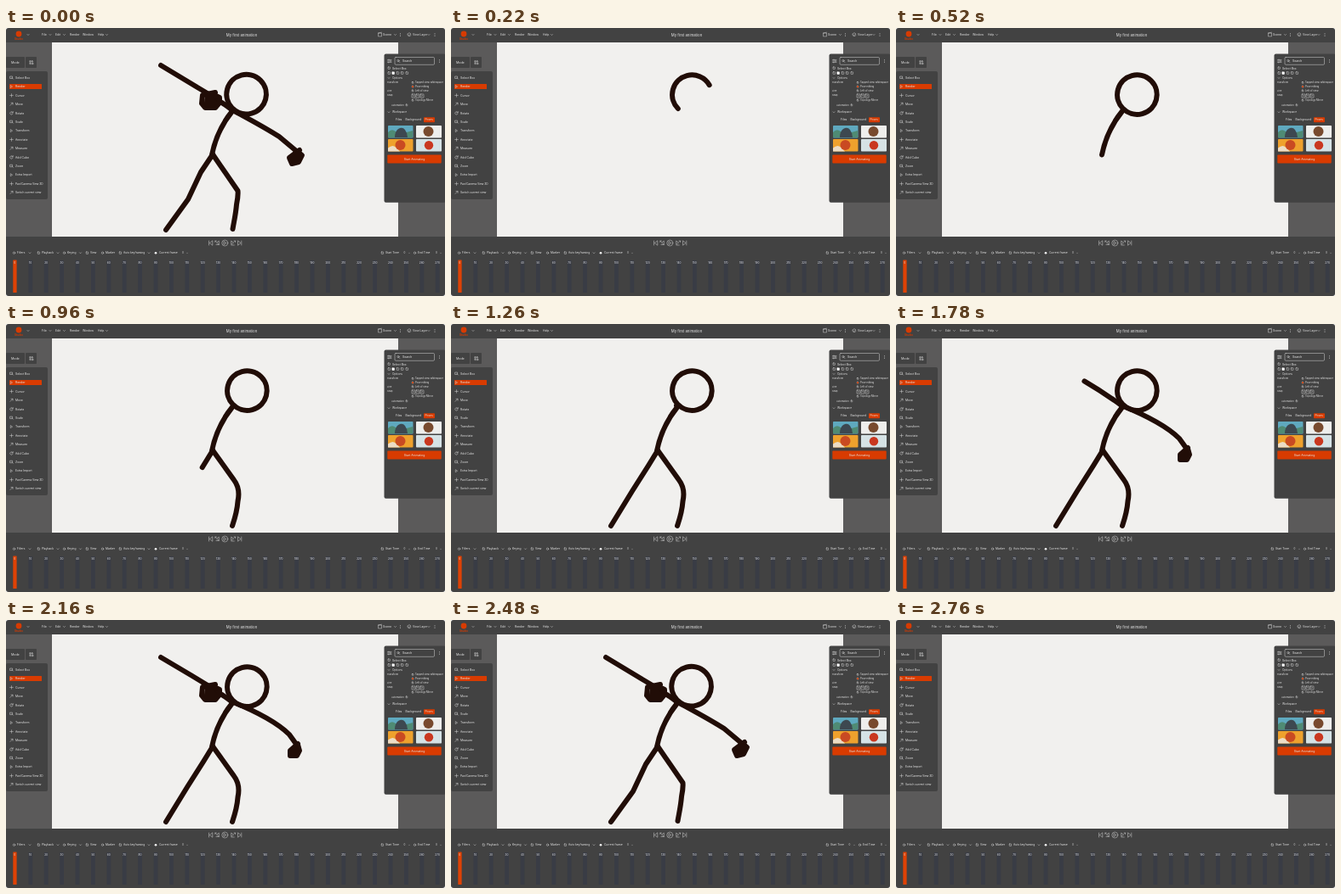
An HTML page for the animation above (2860 ms loop, 516 by 316 pixels).

```html
<!DOCTYPE html>
<html lang="en">
<head>
<meta charset="utf-8">
<title>Stick figure editor</title>
<style>
html, body { margin: 0; width: 100%; height: 100%; overflow: hidden; background: #fff; }
svg { display: block; width: 516px; height: 316px; }
text { font-family: Inter, Roboto, sans-serif; font-size: 3.4px; fill: #e6e6e6; }
.icon { fill: none; stroke: #d4d4d4; stroke-width: .5; stroke-linecap: round; stroke-linejoin: round; }
#figure path { fill: none; stroke: #210d07; stroke-width: 6; stroke-linecap: round; stroke-linejoin: round; }
</style>
</head>
<body>
<svg viewBox="0 0 516 316">
  <rect width="516" height="316" rx="3" fill="#424242"/>
  <rect y="17" width="516" height="229" fill="#5b5a5a"/>
  <rect x="54" y="17" width="407" height="229" fill="#f1f0ee"/>
  <g id="ui"></g>
  <g id="figure"></g>
</svg>
<script>
const NS = 'http://www.w3.org/2000/svg';
const ORANGE = '#d83b01', PANEL = '#424242', LIGHT = '#dedede';
const ui = document.getElementById('ui');
const figure = document.getElementById('figure');

function add(parent, tag, attrs, content) {
  const el = document.createElementNS(NS, tag);
  for (const key in attrs) el.setAttribute(key, attrs[key]);
  if (content !== undefined) el.textContent = content;
  parent.appendChild(el);
  return el;
}
const rect = (x, y, width, height, fill, rx = 0) => add(ui, 'rect', { x, y, width, height, fill, rx });
const disc = (cx, cy, r, fill) => add(ui, 'circle', { cx, cy, r, fill });
const icon = d => add(ui, 'path', { d, class: 'icon' });
const shape = (d, fill) => add(ui, 'path', { d, fill });
const ring = (cx, cy, r) => add(ui, 'circle', { cx, cy, r, class: 'icon' });
const box = (x, y, width, height, rx = .4) => add(ui, 'rect', { x, y, width, height, rx, class: 'icon' });
const label = (text, x, y, size = 3.4, anchor = 'start') =>
  add(ui, 'text', { x, y: y + size * .36, style: `font-size:${size}px`, 'text-anchor': anchor }, text);
const chevron = (x, y) => icon(`M${x - 1} ${y - .5}l1 1 1-1`);
const dots = (x, y) => [-1.5, 0, 1.5].forEach(dy => disc(x, y + dy, .45, LIGHT));

function drawTopBar() {
  disc(15, 7, 3.4, ORANGE);
  add(ui, 'text', { x: 15, y: 13.7, style: `font-size:3.2px;fill:${ORANGE};font-weight:600`, 'text-anchor': 'middle' }, 'Studio');
  chevron(26, 8);
  [['File', 42, 52], ['Edit', 58, 68.5], ['Render', 75], ['Window', 90], ['Help', 108, 118.5]].forEach(([name, x, arrow]) => {
    label(name, x, 7.7);
    if (arrow) chevron(arrow, 8);
  });
  label('My first animation', 277, 8, 4.3, 'middle');
  icon('M437.5 9.5v-3.5h4v3.5zM437.5 6l4-.8');
  label('Scene', 443, 7.7);
  chevron(457.5, 8);
  dots(463.5, 8);
  icon('M472 7l2-1.4 2 1.4-2 1.4zM472 8.5l2 1.4 2-1.4');
  label('View Layer', 478, 7.7, 3.3);
  chevron(497, 8);
  dots(504, 8);
}

function drawTools() {
  rect(0, 34, 22, 13, PANEL, 1);
  rect(23, 34, 13, 13, PANEL, 1);
  label('Mode', 6, 40.5, 3.6);
  box(27.8, 38.8, 1.4, 1.4);
  box(30.2, 38.8, 1.4, 1.4);
  box(27.8, 41.2, 1.4, 1.4);
  ring(31, 42, .9);
  rect(0, 51, 49, 151, PANEL, 2);
  rect(4, 66, 38, 6, ORANGE, .6);
  const tools = ['Select Box', 'Render', 'Cursor', 'Move', 'Rotate', 'Scale', 'Transform', 'Annotate',
    'Measure', 'Add Cube', 'Zoom', 'Extra Import', 'Pan/Camera View 3D', 'Switch current view'];
  const shapes = ['M5 57h2.5v2.5h-2.5zM7 58.7l1.4 1.4', 'M5.6 57.3l2 1.3-2 1.3z', 'M6.5 56.8v3.6M4.7 58.6h3.6',
    'M5 60l3-3M6 57h2v2', 'M8 58a1.7 1.7 0 1 0 0 1.5M8.2 56.7v1.5h-1.4'];
  tools.forEach((name, i) => {
    const y = 58.6 + i * 10.42;
    icon(shapes[i % shapes.length]).setAttribute('transform', `translate(0 ${y - 58.6})`);
    label(name, 11, y, i > 11 ? 3.25 : 3.4);
  });
}

function drawThumbs() {
  rect(449, 115, 29.5, 14.5, '#5fa9bf', .8);
  shape('M449 129v-6q4-5 9-1t9 2l11-3v8z', '#4f8b74');
  shape('M457 129q0-7 4-10 5-3 8 1 3 4 3 9z', '#3d4850');
  rect(482, 115, 30, 14.5, '#eeeeec', .8);
  disc(496.5, 122, 6, '#784a2e');
  rect(449, 131, 29.5, 14.5, '#eea12d', .8);
  shape('M449 145.5v-4q6-5 10 0l4 4z', '#ecdcc5');
  disc(463.5, 138, 6, '#c94a22');
  rect(482, 131, 30, 14.5, '#d5e2e5', .8);
  disc(497, 138.3, 5.2, '#c9371f');
}

function drawSidePanel() {
  rect(444.5, 30.5, 72, 175.2, PANEL, 2);
  icon('M448.5 37.5h4.5M448.5 39h4.5M448.5 40.5h4.5M450 37v1M452 38.5v1M449.8 40v1');
  box(457, 34.5, 46.5, 8.8, 1.2);
  ring(461, 38.6, 1.1);
  icon('M461.8 39.5l1 1');
  label('Search', 466, 38.9, 3.4);
  dots(509.5, 39);
  box(449, 46, 2.4, 2.4);
  label('Select Box', 454, 47.4, 3.3);
  [449, 453.8, 459.2, 464.4, 470].forEach((x, i) => {
    box(x, 51.8, 2.6, 2.6);
    if (i === 1) rect(x, 51.8, 2.8, 2.8, '#fff');
  });
  chevron(450, 59);
  label('Options', 454, 58.9, 3.3);
  label('Transform', 448, 64.4, 2.7);
  label('Tapped view whitespace', 481, 64.4, 2.8);
  label('Pose editing', 481, 69.2, 2.8);
  label('Line', 448, 74, 2.7);
  label('Left of view', 481, 74, 2.8);
  label('Snap', 448, 79.4, 2.7);
  [64.4, 69.2, 74].forEach((y, i) => {
    box(477.2, y - .9, 1.8, 1.8);
    if (i === 1) rect(477.2, y - .9, 1.8, 1.8, ORANGE);
  });
  [477, 482, 487].forEach((x, i) => {
    box(x, 78, 4, 4.2);
    label('XYZ'[i], x + 2, 80.1, 2.5, 'middle');
  });
  box(477.2, 84.4, 1.8, 1.8);
  label('Topology Mirror', 481, 85.4, 2.8);
  label('Automation', 453, 91, 2.7);
  box(470, 90, 1.8, 1.8);
  chevron(450, 99.3);
  label('Workspace', 454, 99.1, 3.2);
  label('Files', 458, 108.2);
  label('Background', 469.5, 108.2, 3.3);
  rect(491, 105.3, 13, 6, ORANGE, .8);
  label('Poses', 497.2, 108.2, 3.3, 'middle');
  drawThumbs();
  rect(448.3, 149.4, 63.4, 10.2, ORANGE, 1);
  label('Start Animating', 480, 154.4, 3.4, 'middle');
}

function drawTransport() {
  icon('M238.5 251v5M242.5 251l-3.2 2.5 3.2 2.5z');
  icon('M250 251.2l-2.5 2 2.5 2zM246 251l1 1M247 255.5h3.3M245.8 252.5v-1.5h1.5');
  ring(257.3, 253.5, 3.5);
  icon('M256.3 251.8l2.7 1.7-2.7 1.7z');
  icon('M265 251.2l2.5 2-2.5 2zM269.5 251l-1 1M265 256h3.3M269.6 252.5v-1.5h-1.5');
  icon('M276.8 251v5M272.8 251l3.2 2.5-3.2 2.5z');
}

function drawTimeline() {
  const items = [['Filters', 13, 28], ['Playback', 42, 61], ['Keying', 72, 87.5], ['View', 99], ['Marker', 117],
    ['Auto keyframing', 138, 168], ['Current frame', 180], ['Start Time', 446], ['End Time', 484]];
  items.forEach(([name, x, arrow], i) => {
    if (i === 6) disc(x - 4, 265.2, 1.3, '#fff');
    else if (i % 2) box(x - 4.8, 264, 2.4, 2.4);
    else ring(x - 3.5, 265.2, 1.2);
    label(name, x, 265.1, 3.25);
    if (arrow) chevron(arrow, 265.3);
  });
  [207, 467.5, 505].forEach(x => label('0', x, 265.1, 3));
  [213, 474, 511].forEach(x => disc(x, 265.3, .45, LIGHT));
  for (let i = 0; i <= 27; i++) {
    const x = 10.3 + i * 18.4;
    if (i) rect(x - 2.3, 274, 4.8, 38, '#393c45');
    else rect(8.3, 273.5, 4.3, 38.5, '#df4205', .5);
    label(i * 10, x, 276.6, 3.1, 'middle');
  }
}

drawTopBar();
drawTools();
drawSidePanel();
drawTransport();
drawTimeline();

// Strokes in drawing order: start and end time, drawn pose, settled pose.
const strokes = [
  { from: 20, to: 390, pose: 'M266.8 95A23.3 23.3 0 1 1 267 95.2', settled: 'M266 94.5A23.3 23.3 0 1 1 266.2 94.7' },
  { from: 390, to: 520, pose: 'M266 98Q248 120 242 149.5' },
  { from: 550, to: 885, pose: 'M243 149L268 184C274 192 274 202 272.5 209C271.5 222 269 229 266 238',
    settled: 'M243 149L272.5 192C273 197 272 203 271 208C270 220 268 228 266.5 237' },
  { from: 880, to: 1240, pose: 'M243 149L232 167L213 197L188 238', settled: 'M243 149L229 170L214 202L188 238' },
  { from: 1260, to: 1550, pose: 'M265 96C292 107 317 119 333 135L343 149',
    settled: 'M265 96C285 107 304 117 321 128L346 149' },
  { from: 1550, to: 1640, pose: 'M343 146L334 154L334 160L342 160L345 154L343 147L338 155L341 156',
    settled: 'M345 144L333 153L336 160L344 158L348 150L343 146L339 155L343 153' },
  { from: 1640, to: 1905, pose: 'M265 96Q243 80 219 66L182 44', settled: 'M265 96Q246 82 225 70L182 44' },
  { from: 1905, to: 2150, pose: 'M246 76L231 79L230 89L234 94L246 94L251 88L251 82L245 79L237 82L236 89L246 89L242 85' }
];
const LOOP = 2860, SETTLE_START = 2180, SETTLE_END = 2360, CLEAR = 2700;

strokes.forEach(s => s.el = add(figure, 'path', { pathLength: 1 }));

const clamp = v => Math.max(0, Math.min(1, v));
function blend(a, b, k) {
  const ends = b.match(/[\d.]+/g);
  let i = 0;
  return a.replace(/[\d.]+/g, n => +n + (ends[i++] - n) * k);
}

function render(time) {
  const still = time < 20;
  const settle = still ? 1 : clamp((time - SETTLE_START) / (SETTLE_END - SETTLE_START));
  figure.style.display = time >= CLEAR ? 'none' : '';
  for (const s of strokes) {
    const drawn = still ? 1 : clamp((time - s.from) / (s.to - s.from));
    s.el.style.display = drawn > 0 ? '' : 'none';
    s.el.setAttribute('d', s.settled ? blend(s.pose, s.settled, settle) : s.pose);
    s.el.setAttribute('stroke-dasharray', drawn < 1 ? `${drawn} 2` : 'none');
  }
}

const start = performance.now();
function tick() {
  render((performance.now() - start) % LOOP);
  requestAnimationFrame(tick);
}
tick();
</script>
</body>
</html>
```
